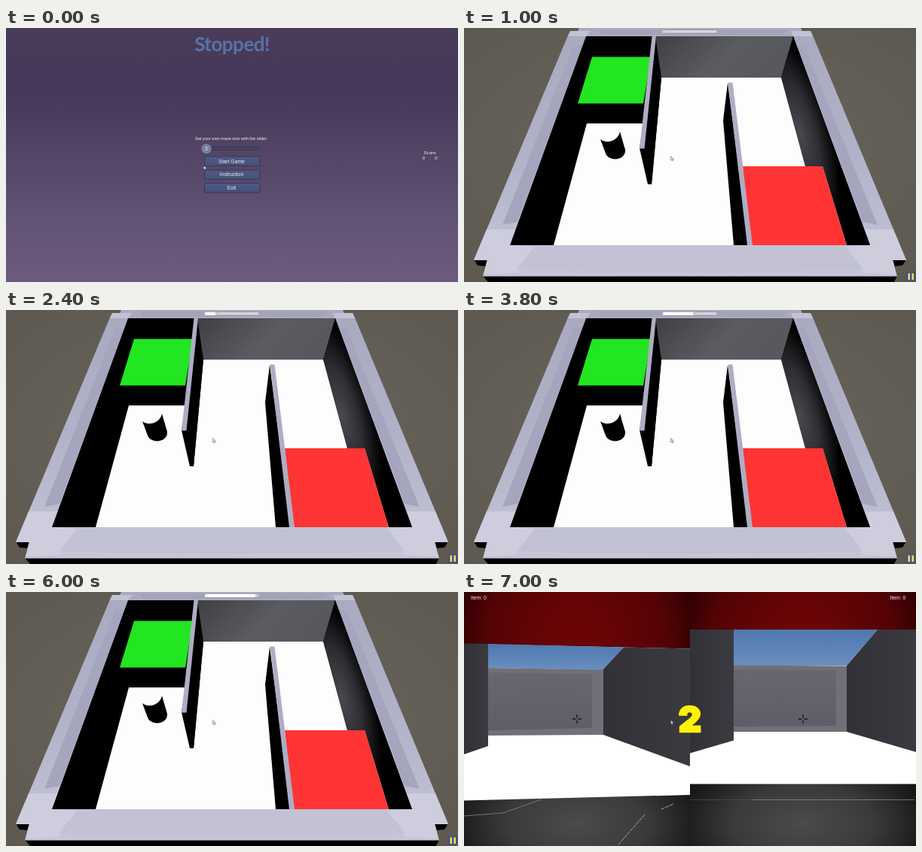
These frames come from a looping animation (600 px wide and 338 px high, 8 s). An HTML page:

```html
<!DOCTYPE html>
<html lang="en">
<head>
<meta charset="utf-8">
<title>Maze game</title>
<style>
  html, body { margin: 0; width: 100%; height: 100%; overflow: hidden; background: #4a3c5c; }
  svg { display: block; width: 100%; height: 100%; }
  text { font-family: "Liberation Sans", Arial, sans-serif; fill: #f2f0f5; }
  .mid { text-anchor: middle; }
  .title { font: 700 26px Lato, sans-serif; letter-spacing: -.5px; fill: #5674a3; }
  .count { font: 900 47px Inter, sans-serif; fill: #fff200; stroke: #fff200; stroke-width: 2.4px; }

  /* 8 s loop: menu until 1 s, loading until 6.2 s, then the split view */
  .menu, .maze, .split, .hover, .three, .two, .pointer, .load {
    animation: 8s step-end infinite;
  }
  .menu { animation-name: menu; }
  .maze { animation-name: maze; }
  .split { animation-name: split; }
  .hover { animation-name: hover; }
  .three { animation-name: three; }
  .two { animation-name: two; }
  .pointer { animation-name: pointer; }
  .load { animation-name: load; }

  @keyframes menu { 0% { visibility: visible } 12.5%, 100% { visibility: hidden } }
  @keyframes maze { 0% { visibility: hidden } 12.5% { visibility: visible } 77.5%, 100% { visibility: hidden } }
  @keyframes split { 0% { visibility: hidden } 77.5%, 100% { visibility: visible } }
  @keyframes hover { 0% { opacity: 0 } 2.5%, 100% { opacity: 1 } }
  @keyframes three { 0%, 77.5% { opacity: 1 } 87.5%, 100% { opacity: 0 } }
  @keyframes two { 0% { opacity: 0 } 87.5%, 100% { opacity: 1 } }
  @keyframes pointer {
    0% { transform: translate(262.5px, 183px) }
    2.5% { transform: translate(272px, 177px) }
    12.5%, 100% { transform: translate(274.5px, 170.5px) }
  }
  /* the bar advances once every 200 ms */
  @keyframes load {
    0%, 12.5% { transform: translateX(265px); animation-timing-function: steps(7) }
    30% { transform: translateX(280px); animation-timing-function: steps(7) }
    47.5% { transform: translateX(306px); animation-timing-function: steps(11) }
    75%, 100% { transform: translateX(333px) }
  }
</style>
</head>
<body>
<svg viewBox="0 0 600 338" preserveAspectRatio="none">
  <defs>
    <linearGradient id="dusk" x2="0" y2="1">
      <stop offset="0" stop-color="#4b3b5b"/>
      <stop offset=".24" stop-color="#453758"/>
      <stop offset=".5" stop-color="#544566"/>
      <stop offset=".75" stop-color="#625273"/>
      <stop offset="1" stop-color="#6c5b7d"/>
    </linearGradient>
    <linearGradient id="btn" x2="0" y2="1">
      <stop offset="0" stop-color="#4d5a88"/>
      <stop offset="1" stop-color="#465079"/>
    </linearGradient>
    <radialGradient id="table" r=".75">
      <stop offset="0" stop-color="#6b675e"/>
      <stop offset="1" stop-color="#5c5850"/>
    </radialGradient>
    <linearGradient id="back" x2="1" y2=".3">
      <stop offset="0" stop-color="#3e3e43"/>
      <stop offset=".6" stop-color="#5b5b62"/>
      <stop offset="1" stop-color="#57575e"/>
    </linearGradient>
    <radialGradient id="side" gradientUnits="userSpaceOnUse" cx="0" cy="0" r="1"
      gradientTransform="translate(446 140) rotate(75) scale(135 42)">
      <stop offset="0" stop-color="#48484e"/>
      <stop offset=".5" stop-color="#2c2c31"/>
      <stop offset="1" stop-color="#000"/>
    </radialGradient>
    <linearGradient id="rail" x2="0" y2="1">
      <stop offset="0" stop-color="#a9a9c0"/>
      <stop offset=".5" stop-color="#b1b1c8"/>
      <stop offset="1" stop-color="#c6c6d8"/>
    </linearGradient>
    <linearGradient id="sky" x2="0" y2="1">
      <stop offset="0" stop-color="#4f78b0"/>
      <stop offset="1" stop-color="#6a8fbf"/>
    </linearGradient>
    <linearGradient id="panel" x2="0" y2="1">
      <stop offset="0" stop-color="#68666f"/>
      <stop offset="1" stop-color="#5f5d67"/>
    </linearGradient>
    <linearGradient id="dark" x2="1" y2="0">
      <stop offset="0" stop-color="#323137"/>
      <stop offset="1" stop-color="#3b3a41"/>
    </linearGradient>
    <radialGradient id="roof" gradientUnits="userSpaceOnUse" cx="150" cy="60" r="180">
      <stop offset=".2" stop-color="#680406"/>
      <stop offset=".65" stop-color="#540305"/>
      <stop offset="1" stop-color="#220002"/>
    </radialGradient>
    <radialGradient id="base" gradientUnits="userSpaceOnUse" cx="0" cy="0" r="1"
      gradientTransform="translate(150 308) scale(190 100)">
      <stop offset="0" stop-color="#4b4b4b"/>
      <stop offset=".5" stop-color="#3a3a3a"/>
      <stop offset="1" stop-color="#0c0c0c"/>
    </radialGradient>
    <clipPath id="track"><rect x="264" y="2.5" width="72" height="4.5" rx="1.5"/></clipPath>
    <path id="cross" d="M-6 0H-1.5M1.5 0H6M0-6V-1.5M0 1.5V6" stroke="#141418" stroke-width="1.3"/>
  </defs>

  <g class="menu">
    <rect width="600" height="338" fill="url(#dusk)"/>
    <text class="title mid" x="300" y="31">Stopped!</text>
    <text class="mid" x="298.5" y="149" font-size="5.6">Set your own maze size with the slider</text>
    <rect x="266" y="158.5" width="70" height="3.5" rx="1" fill="#4b4562" stroke="#332b45" stroke-width=".8"/>
    <circle cx="266" cy="160.5" r="6.6" fill="#78809d"/>
    <text class="mid" x="266" y="163" font-size="6.8">3</text>
    <g fill="url(#btn)" stroke="#372f4c" stroke-width=".8">
      <rect x="263.5" y="171" width="73.5" height="12.5" rx="1.5"/>
      <rect x="263.5" y="189" width="73.5" height="12.5" rx="1.5"/>
      <rect x="263.5" y="206.5" width="73.5" height="12.5" rx="1.5"/>
    </g>
    <rect class="hover" x="263.5" y="171" width="73.5" height="12.5" rx="1.5" fill="#403b59" stroke="#332b45" stroke-width=".8"/>
    <g class="mid" font-size="6.8">
      <text x="299.5" y="179.5">Start Game</text>
      <text x="299.5" y="197.3">Instruction</text>
      <text x="299.5" y="215">Exit</text>
    </g>
    <g class="mid" font-size="6.2">
      <text x="562.5" y="168">Score</text>
      <text x="554.5" y="175">0</text>
      <text x="562.5" y="175" opacity=".5">:</text>
      <text x="571" y="175">0</text>
    </g>
  </g>

  <g class="maze">
    <rect width="600" height="338" fill="url(#table)"/>
    <path d="M13 308H31L28 317L18 316ZM587 308H569L572 317L582 316ZM25 330H575L571 338H32Z"/>
    <path d="M153 0H447L449 4H460L463 10L587 309H569L575 330.500H25L31 309H13L138 10L141 4H151Z" fill="url(#rail)"/>
    <!-- lighter corners and panels of the rim -->
    <path d="M141 4H168L162 11H138ZM460 4H434L437 11H463Z" fill="#c2c2d3"/>
    <path d="M30 268H70L61 289L94 291L70 326L26 328L31 309H13ZM570 268H530L539 289L506 291L530 326L574 328L569 309H587Z" fill="#cdcddd"/>
    <path d="M94 291H506L530 321Q300 328 70 321Z" fill="#c2c2d4"/>
    <path d="M145 24L157 24L71 258L51 262ZM452 24L443 24L529 258L549 262Z" fill="#a5a5bd"/>
    <path d="M178 2H428L424 9H182Z" fill="#a4a4b8"/>

    <path d="M162 11H437L539 289H61Z"/>
    <path d="M252 11H437L421 66H262Z" fill="url(#back)"/>
    <path d="M437 11L539 289H508L476 184H453L421 66Z" fill="url(#side)"/>
    <path d="M163 127H240L249 208L262 66H421L453 184H476L508 289H119Z" fill="#fdfdfd"/>
    <path d="M170 38.500H248L238 100.500H151Z" fill="#22e622"/>
    <path d="M370 184H476L508 289H380Z" fill="#ff3434"/>

    <path d="M254 11L262 66L249 208H244L233 160L238 126Z"/>
    <path d="M249.500 11H255L239.500 160.500H233Z" fill="#adadc4"/>
    <path d="M350 73L344 123L358 289H378Z"/>
    <path d="M350.500 72.500H356.500L383 289H376Z" fill="#adadc4"/>
    <path d="M181 148C187 154 204 152 207 138L214 162C215 177 192 178 188 167Z"/>

    <rect x="264" y="2.500" width="72" height="4.5" rx="1.5" fill="#d5d5d9" stroke="#8c8c9c" stroke-width=".7"/>
    <g clip-path="url(#track)">
      <rect class="load" x="-72" y="2.5" width="72" height="4.5" fill="#fff"/>
    </g>
    <circle class="load" cy="4.8" r="2.4" fill="#c9c9cd"/>

    <rect x="586.500" y="324.500" width="12.5" height="12.5" fill="#4a5180"/>
    <path d="M589.500 326.500h2.500v8.500h-2.500zM594.500 326.500h2.500v8.500h-2.500z" fill="#ece458"/>
  </g>

  <g class="split">
    <rect width="600" height="338" fill="#fff"/>
    <path d="M0 0H300V75.500L0 69Z" fill="url(#roof)"/>
    <path d="M32 69L212 73.500L185 104L32 101Z" fill="url(#sky)"/>
    <path d="M32 101L185 103.500V190L32 191Z" fill="#716f78"/>
    <path d="M32 107L170 109V181L32 184Z" fill="url(#panel)"/>
    <path d="M0 68.500L32 69V205L0 216Z" fill="url(#dark)"/>
    <path d="M212 73.500L300 75.500V232L185 190V103Z" fill="url(#dark)"/>
    <path d="M0 277.500L300 270V338H0Z" fill="url(#base)"/>
    <g fill="none" stroke="#8d8871" stroke-width=".8">
      <path d="M0 298L52 294L103 276"/>
      <path d="M205 336L241 295M262 289L278 282" stroke="#c9c7bd" stroke-dasharray="5 1"/>
    </g>

    <g transform="translate(300)">
      <path d="M0 0H300V50H0Z" fill="url(#roof)"/>
      <path d="M58 50H249L208 98H58Z" fill="url(#sky)"/>
      <path d="M58 97.500L208 98.500V186H58Z" fill="#716f78"/>
      <path d="M58 103L194 104V178L58 179Z" fill="url(#panel)"/>
      <path d="M0 50H58V197.500L0 214.500Z" fill="url(#dark)"/>
      <path d="M249 50H300V213L208 186V98Z" fill="url(#dark)"/>
      <path d="M0 255.500H300V338H0Z" fill="url(#base)"/>
      <path d="M0 276.500H83" stroke="#5a5952" stroke-width=".6"/>
      <path d="M83 276.500H298" stroke="#8d8b7c" stroke-width=".8"/>
    </g>

    <use href="#cross" x="150" y="169"/>
    <use href="#cross" x="450" y="169"/>
    <text x="9" y="10" font-size="6.8">Item: 0</text>
    <text x="565.500" y="10" font-size="6.8">Item: 0</text>
    <text class="count mid three" x="300" y="186">3</text>
    <text class="count mid two" x="300" y="186">2</text>
  </g>

  <path class="pointer" d="M0 0V5.500L1.300 4.400L2.200 6.300L3 5.900L2.200 4.100H3.900Z" fill="#fff" stroke="#222" stroke-width=".5"/>
</svg>
</body>
</html>
```
